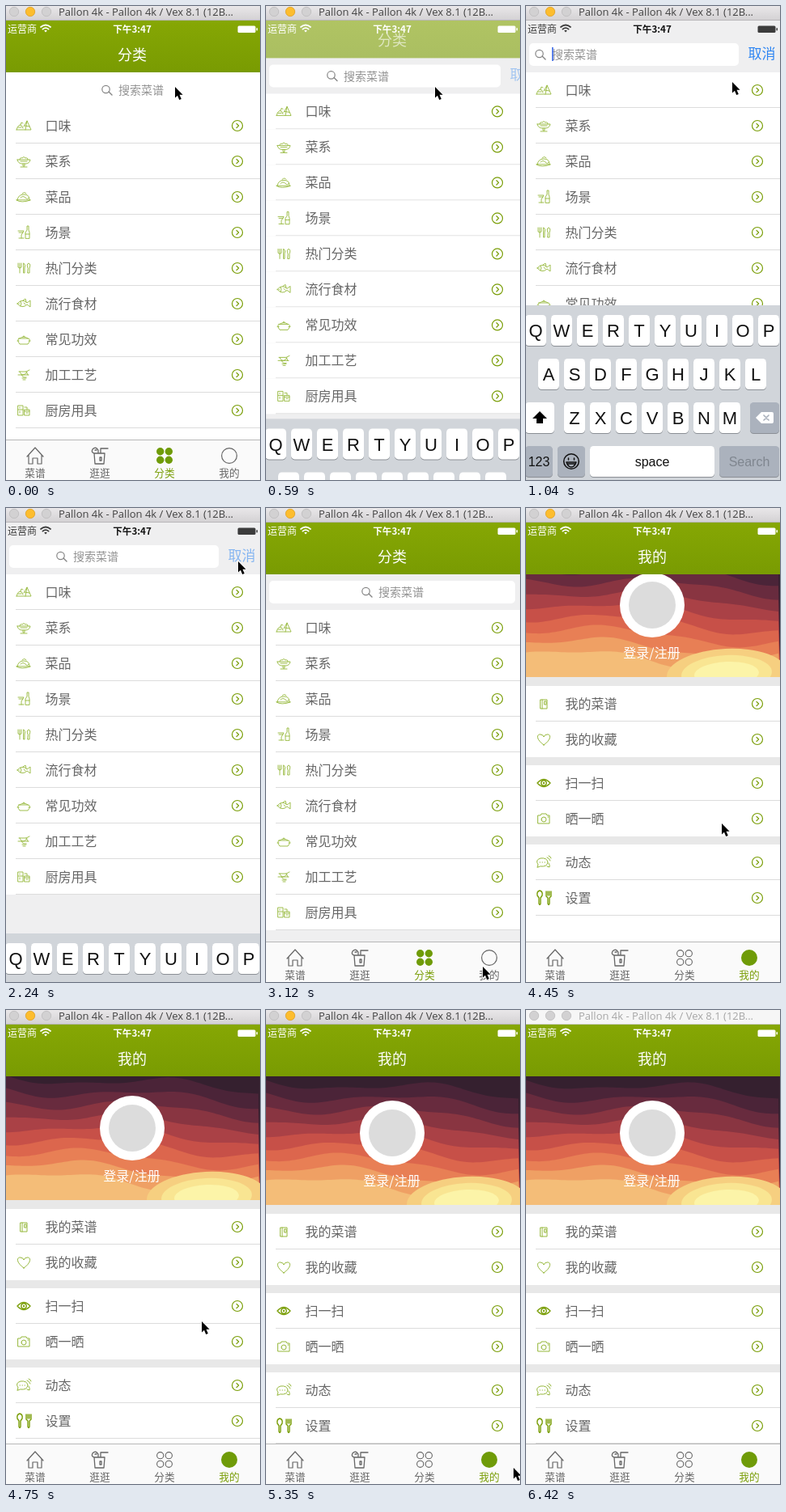
Animation, 314 px wide and 586 px high, one loop 6520 ms. Source, as an HTML page with a canvas:

```html
<!DOCTYPE html>
<html lang="zh">
<head>
<meta charset="utf-8">
<title>分类</title>
<style>
html, body { margin: 0; width: 100%; height: 100%; overflow: hidden; background: #fff; }
canvas { display: block; width: 314px; height: 586px; }
</style>
</head>
<body>
<canvas id="stage"></canvas>
<script>
const W = 314, H = 586, LOOP = 6520, STEP = 148.35;
const canvas = document.getElementById('stage');
const g = canvas.getContext('2d');
const dpr = window.devicePixelRatio || 1;
canvas.width = W * dpr;
canvas.height = H * dpr;

const CJK = '"Noto Sans CJK SC", "Noto Sans CJK", sans-serif';
const LATIN = '"Liberation Sans", sans-serif';
const GREEN = '#7a9e08', PALE = '#96b83c', GREY = '#666', LINE = '#dcdcdc', BACK = '#efeff0';

// Poses by step number: [step, value, ...]
const moves = {
  cursor: [[0, 209, 100], [4, 209, 100], [6, 245, 100], [7, 255, 94], [8, 265, 85], [9, 279, 74],
    [10, 283, 70], [11, 287, 66], [16, 287, 66], [17, 286, 78], [18, 283, 165], [19, 276, 350],
    [20, 270, 530], [21, 268, 567], [23, 268, 567], [24, 267, 541], [26, 267, 541], [27, 261, 490],
    [28, 248, 425], [29, 243, 412], [30, 242, 390], [31, 242, 385], [32, 242, 385], [33, 252, 405],
    [34, 270, 450], [35, 290, 510], [36, 306, 566], [37, 330, 600]],
  up: [[2, 0], [3, 0.4], [4, 1], [15, 1], [16, 0.5], [17, 0]],
  keys: [[2, 0], [3, 0.35], [4, 0.85], [5, 1], [13, 1], [14, 0.85], [15, 0.278], [16, 0.03], [17, 0]],
  hint: [[2, 118], [3, 75], [4, 11], [13, 11], [14, 24], [15, 62], [16, 100], [17, 118]],
  scroll: [[28, 0], [29, 10], [30, 32], [31, 18], [32, 6], [33, 0]]
};

function pose(track, k) {
  const i = track.findIndex(p => p[0] >= k);
  if (i < 0) return track[track.length - 1].slice(1);
  if (i === 0) return track[0].slice(1);
  const a = track[i - 1], b = track[i], f = (k - a[0]) / (b[0] - a[0]);
  return a.slice(1).map((v, n) => v + (b[n + 1] - v) * f);
}

function rect(x, y, w, h, fill) {
  g.fillStyle = fill;
  g.fillRect(x, y, w, h);
}
function round(x, y, w, h, r, fill) {
  g.fillStyle = fill;
  g.beginPath();
  g.roundRect(x, y, w, h, r);
  g.fill();
}
function disc(x, y, r, fill, stroke, width = 1) {
  g.beginPath();
  g.arc(x, y, r, 0, Math.PI * 2);
  if (fill) { g.fillStyle = fill; g.fill(); }
  if (stroke) { g.strokeStyle = stroke; g.lineWidth = width; g.stroke(); }
}
function text(s, x, cy, size, fill, align = 'left', weight = 300, family = CJK) {
  g.font = `${weight} ${size}px ${family}`;
  g.textAlign = align;
  g.fillStyle = fill;
  g.fillText(s, x, cy + size * 0.37);
}
function icon(d, x, y, stroke, width = 1, fill) {
  const p = new Path2D(d);
  g.save();
  g.translate(x, y);
  g.lineJoin = g.lineCap = 'round';
  if (fill) { g.fillStyle = fill; g.fill(p); }
  if (stroke) { g.strokeStyle = stroke; g.lineWidth = width; g.stroke(p); }
  g.restore();
}
function gradient(y0, y1, ...colors) {
  const gr = g.createLinearGradient(0, y0, 0, y1);
  colors.forEach((c, i) => gr.addColorStop(i / (colors.length - 1), c));
  return gr;
}

const foods = [
  ['口味', 'M-9 5Q-8 0-5-1Q-2-1-1 3M-9 5H9L4-6L0 1M4-6L2 5M1 0L7 1M-7 2L-3 2M-4-1L-3-4L-1-3'],
  ['菜系', 'M-8-2H8Q7 3 2 3H-2Q-7 3-8-2M-5-2Q-5-5-2-4Q0-7 2-4Q5-5 5-2M-1 3V6H1V3M-4 7H4M-4 0H4'],
  ['菜品', 'M-8 4Q-7-3 0-3Q7-3 7 3M-9 4Q-3 8 8 4ZM-2-4Q1-7 3-4M-4 1Q-1-2 2 1T6 1'],
  ['场景', 'M-7-2H0L-3 3V7M-6 7H0M-6 0H-1M2 7V0L4-3V-8H6V-3L7 0V7ZM2 2H7'],
  ['热门分类', 'M-7-6V-1Q-5 1-3-1V-6M-5-6V6M0-6Q3-4 1 0V6H0ZM5 0Q3-5 6-6Q9-5 7 0V6H5Z'],
  ['流行食材', 'M-8 0Q-2-7 4-1L8-4V4L4 1Q-2 7-8 0ZM-4-3Q-2 0-4 3M-6 0H-5.5M-1-4L2-6L3-2M0-1L2 1'],
  ['常见功效', 'M-6-1H6Q9 1 5 6H-5Q-9 1-6-1ZM-5-1Q0-5 5-1M-1-3Q0-6 1-3M-6 2H-8M6 2H8'],
  ['加工工艺', 'M-6-4H3L7-6M-5-4Q-4 0 0 0L4-3M-7 0H6M-3 0Q-1 4 3 3M-2 4H3M-1 6H2M3-4L5 0'],
  ['厨房用具', 'M-7-6H-1V6H-7ZM-7-1H-1M-5-4V-3M1-1H7V6H1ZM1 1H7M1-4H4V-1M3 3H5M-5 1V3']
];
const own = [
  ['我的菜谱', 'M-4-5H4V6H-4ZM-2-5V6M1-3H3V1H1Z'],
  ['我的收藏', 'M0 7C-11-1-8-7-4-6Q-1-6 0-3Q1-6 4-6C8-7 11-1 0 7Z'],
  ['扫一扫', 'M-8 0Q0-9 8 0Q0 9-8 0Z'],
  ['晒一晒', 'M-7-4H-4L-3-6H3L4-4H7V6H-7ZM-3 1A3 3 0 1 0 3 1A3 3 0 1 0-3 1M5-2H6'],
  ['动态', 'M-8 6L-7 3Q-11-3-4-5Q4-6 5 0Q4 6-4 5ZM-5 0H-4.5M-2 0H-1.5M1 0H1.5M6 1Q8 4 7 6L4 5M4-6Q7-5 8-2M6-8Q9-7 9-5'],
  ['设置', 'M-5-9Q-9-8-8-3L-6 0V7Q-5 10-4 7V0L-2-3Q-1-8-5-9ZM3-8V-2L5 0V7Q6 10 7 7V0L9-2V-8M5-8V-3M7-8V-3']
];

function row(y, [name, shape], color, width) {
  rect(0, y, W, 44, '#fff');
  icon(shape, 22, y + 22, color, width);
  text(name, 48.5, y + 22, 16, GREY);
  disc(286, y + 22, 6.5, null, GREEN, 1.2);
  icon('M-1-2.6L1.6 0L-1 2.6', 286, y + 22, GREEN, 1.3);
}
function rule(y) { rect(12, y, W - 12, 1, LINE); }

function windowBar(active) {
  rect(0, 0, W, 18, active ? gradient(0, 18, '#e9e7e9', '#d3d1d3') : '#f6f6f6');
  rect(0, 17, W, 1, active ? '#b9b7b9' : '#d5d5d5');
  [10, 30, 50].forEach((x, i) => {
    const lit = active && i === 1;
    disc(x, 7, 5.7, lit ? '#fdbd2e' : '#d2d1d2', lit ? '#dfa023' : '#bdbcbd', 0.8);
  });
  text('Pallon 4k - Pallon 4k / Vex 8.1 (12B...', 65, 7.5, 13, active ? '#424242' : '#a6a6a6',
    'left', 400, '"Open Sans", sans-serif');
}

function statusBar(dark) {
  const c = dark ? '#3c3c3c' : '#fff';
  text('运营商', 2, 28.5, 12, c, 'left', 400);
  icon('M-6-2Q0-7 6-2M-3.6.6Q0-2.4 3.6.6', 49, 28, c, 1.8);
  icon('M-1.8 2.6Q0 1 1.8 2.6L0 4.5Z', 49, 28, null, 0, c);
  text('下午3:47', 156, 28.5, 11.6, dark ? '#111' : c, 'center', 700);
  round(286.5, 24.5, 22, 8.5, 1.5, c);
  round(309.5, 27, 1.5, 3.5, 0.7, c);
}

function navBar(title, up) {
  g.save();
  g.globalAlpha = 1 - up;
  rect(0, 18, W, 64 - 44 * up, gradient(18, 82, '#86a704', '#799b02'));
  text(title, 156, 60 - 44 * up, 18, '#fff', 'center', 400);
  g.restore();
  statusBar(up > 0.5);
}

function tabBar(mine) {
  rect(0, 536, W, 50, '#fafafa');
  rect(0, 536, W, 1, '#b8b8b8');
  ['菜谱', '逛逛', '分类', '我的'].forEach((s, i) =>
    text(s, 36 + 80 * i, 577, 12.7, i === (mine ? 3 : 2) ? GREEN : GREY, 'center', 400));
  icon('M-10 1L0-10L10 1M-8-1V10H-3V3H3V10H8V-1', 36, 556, GREY, 1.2);
  icon('M-7-3H6L5 10H-6ZM-7-3Q-11-4-9-8Q-5-12-2-7L-2-3M-6-7H-4M1-3V-9H10M0 2V6H2V2Z', 116, 556, GREY, 1.3);
  for (const dx of [-5.3, 5.3]) for (const dy of [-5.3, 5.3]) {
    if (mine) disc(196 + dx, 556 + dy, 4.1, null, GREY, 1.1);
    else disc(196 + dx, 556 + dy, 4.7, '#6f9b08');
  }
  if (mine) disc(276, 556, 10, '#6f9b08');
  else disc(276, 556, 9.4, null, GREY, 1.2);
}

function searchBar(y, up, hintX, caret, pressed) {
  const right = 308 - 45 * up;
  round(4, y - 14, right - 4, 28, 5, '#fff');
  disc(hintX + 5.5, y - 1, 4.7, null, '#858585', 1.2);
  icon('M9 3L13 7', hintX, y - 1, '#858585', 1.4);
  text('搜索菜谱', hintX + 21, y, 14, '#929292');
  if (caret) rect(32, 51, 1.7, 17, '#4470e8');
  if (up > 0) {
    g.save();
    g.globalAlpha = up * (pressed ? 0.55 : 1);
    text('取消', 274.5 + 45 * (1 - up), y - 1.5, 17, '#2f86f2', 'left', 400);
    g.restore();
  }
}

function key(x, y, w, label, size = 22, fill = '#fff', color = '#111') {
  round(x, y + 1, w, 38, 4.5, '#8b8f95');
  round(x, y, w, 38, 4.5, fill);
  if (label) text(label, x + w / 2, y + 19, size, color, 'center', 400, LATIN);
}

function keyboard(top) {
  const dim = '#abb2bd';
  g.save();
  g.translate(0, top);
  rect(0, 0, W, 220, '#d1d5da');
  [['QWERTYUIOP', -1], ['ASDFGHJKL', 15], ['ZXCVBNM', 47]].forEach(([letters, x], r) =>
    [...letters].forEach((c, i) => key(x + 32 * i, 12 + 54 * r, 26, c)));
  key(-1, 120, 36);
  icon('M0-8L9 1H4V7H-4V1H-9Z', 17, 139, null, 0, '#000');
  key(277, 120, 36, '', 0, dim);
  icon('M-11 0L-4-7H9Q11-7 11-5V5Q11 7 9 7H-4Z', 295, 139, null, 0, '#fff');
  icon('M-1-3L5 3M5-3L-1 3', 295, 139, dim, 1.7);
  key(-1, 174, 34, '123', 16, dim);
  key(39, 174, 34, '', 0, dim);
  disc(56, 193, 9.3, null, '#111', 1.5);
  icon('M-6 1H6Q4 7 0 7Q-4 7-6 1ZM-5 3H5M-3.5-4V-2M3.5-4V-2', 56, 193, '#111', 1.5);
  key(79, 174, 154, 'space', 16);
  key(239, 174, 74, 'Search', 16, dim, '#7f868f');
  g.restore();
}

function categories(k) {
  const [up] = pose(moves.up, k), [keys] = pose(moves.keys, k), [hint] = pose(moves.hint, k);
  const top = 126 - 44 * up;
  rect(0, 18, W, H - 18, k < 2 ? '#fff' : BACK);
  foods.forEach((f, i) => {
    row(top + 44 * i, f, PALE, 0.9);
    rule(top + 44 * i + 43);
  });
  searchBar(top - 22, up, hint, k >= 5 && k < 13 && k !== 10, k >= 13);
  navBar('分类', up);
  tabBar(false);
  if (keys > 0) keyboard(H - 216 * keys);
}

function sunset(bottom) {
  const bands = ['#4b2438', '#682b3e', '#893541', '#aa4146', '#c75048', '#dc664d', '#e87f55', '#efa064', '#f4bd78'];
  rect(0, 82, W, bottom - 82, '#35202f');
  bands.forEach((c, i) => {
    g.beginPath();
    g.moveTo(0, bottom);
    for (let x = 0; x <= W; x += 4) {
      const wave = Math.sin(x / 43 + i * 0.35) * 7 + Math.sin(x / 19 - i) * 2.5;
      g.lineTo(x, bottom - 145 + i * 15.5 + wave + (x - 157) * 0.06);
    }
    g.lineTo(W, bottom);
    g.fillStyle = c;
    g.fill();
  });
  g.save();
  g.beginPath();
  g.rect(0, 82, W, bottom - 82);
  g.clip();
  [['#f6cf80', 74, 31], ['#f9e592', 56, 23], ['#fcf4a8', 40, 15]].forEach(([c, rx, ry]) => {
    g.fillStyle = c;
    g.beginPath();
    g.ellipse(248, bottom - 4, rx, ry, -0.05, 0, Math.PI * 2);
    g.fill();
  });
  g.restore();
}

function profile(k) {
  const [dy] = pose(moves.scroll, k);
  rect(0, 82, W, H - 82, '#e8e8e8');
  sunset(241 - dy);
  disc(156, 152 - dy, 40, '#fff');
  disc(156, 152 - dy, 29, '#dcdcdc');
  text('登录/注册', 155.5, 211 - dy, 16, '#fff', 'center', 300);
  own.forEach((item, i) => {
    const y = 252 + 44 * i + 10 * (i >> 1) - dy;
    row(y, item, i === 2 || i === 5 ? GREEN : PALE, i === 2 || i === 5 ? 1.4 : 1);
    if (i === 2) {
      disc(22, y + 22, 3.2, null, GREEN, 1.4);
      disc(22, y + 22, 1.2, GREEN);
    }
    if (i % 2 === 0) rule(y + 43);
  });
  rect(0, 536 - dy, W, 44, '#fff');
  rule(535 - dy);
  navBar('我的', 0);
  tabBar(true);
}

function pointer(x, y) {
  icon('M0 0V13.5L3 10.7L5.2 16L7.8 15L5.5 9.8H9.6Z', x, y, '#fff', 1.6, '#000');
  icon('M0 0V13.5L3 10.7L5.2 16L7.8 15L5.5 9.8H9.6Z', x, y, null, 0, '#000');
}

function draw(now) {
  const t = now % LOOP, k = Math.floor(t / STEP);
  g.setTransform(dpr, 0, 0, dpr, 0, 0);
  if (k < 22) categories(k);
  else profile(k);
  windowBar(t < 6420);
  if (k < 37) pointer(...pose(moves.cursor, k));
}

const start = performance.now();
function tick() {
  draw(performance.now() - start);
  requestAnimationFrame(tick);
}
tick();
</script>
</body>
</html>
```
